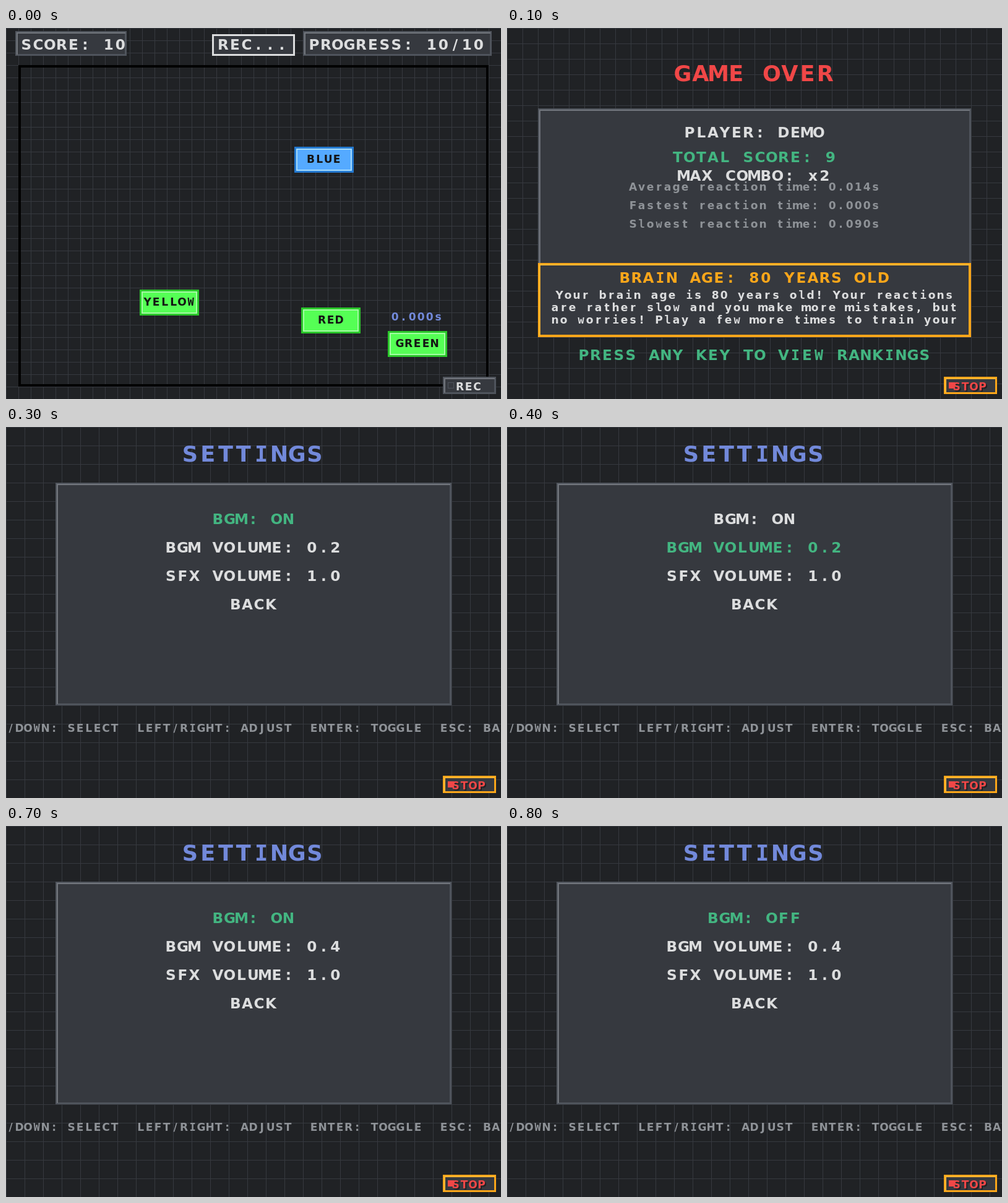
Recreate the animation shown at these times as an HTML page with a canvas. Size 800 px wide and 600 px high, loop 0.9 s.

```html
<!DOCTYPE html>
<html lang="en">
<head>
<meta charset="utf-8">
<title>Reaction game</title>
<style>
  html, body { margin: 0; width: 100%; height: 100%; overflow: hidden; background: #202225; }
  canvas { display: block; }
</style>
</head>
<body>
<canvas id="stage" width="800" height="600"></canvas>
<script>
const ctx = document.getElementById('stage').getContext('2d');

const BACK = '#202225', PANEL = '#36393f', EDGE = '#4f545c', SHINE = '#72767d';
const WHITE = '#dcddde', MUTED = '#8e9297', BLUE = '#7289da', GREEN = '#43b581';
const RED = '#f04747', ORANGE = '#faa61a', GOLD = '#ffb732';
const SMALL = 14, MEDIUM = 19, LARGE = 28.8;   // width of one character cell
const STEP = 100, STEPS = 9;

function rect(x, y, w, h, color) {
  ctx.fillStyle = color;
  ctx.fillRect(x, y, w, h);
}

function frame(x, y, w, h, line, color) {
  ctx.strokeStyle = color;
  ctx.lineWidth = line;
  ctx.strokeRect(x + line / 2, y + line / 2, w - line, h - line);
}

function grid(size) {
  rect(0, 0, 800, 600, BACK);
  for (let x = 0; x < 800; x += size) rect(x, 0, 1, 600, PANEL);
  for (let y = 0; y < 600; y += size) rect(0, y, 800, 1, PANEL);
}

function panel(x, y, w, h, edge = EDGE, shine = SHINE, line = 3) {
  rect(x, y, w, h, PANEL);
  frame(x, y, w, h, line, edge);
  rect(x + 2, y + 2, w - 4, 2, shine);
  rect(x + 2, y + 2, 2, h - 4, shine);
}

// Fixed-pitch text; the narrowest and widest letters use the monospaced cut.
function text(string, x, middle, cell, color) {
  const size = cell * 1.22;
  ctx.fillStyle = color;
  ctx.textAlign = 'center';
  [...string].forEach((char, i) => {
    const family = /[IWilw]/.test(char) ? 'DejaVu Sans Mono' : 'DejaVu Sans';
    ctx.font = `bold ${size}px "${family}", monospace`;
    ctx.fillText(char, x + cell * (i + 0.47), Math.round(middle + size * 0.36));
  });
}

function centered(string, middle, cell, color, x = 400) {
  text(string, x - string.length * cell / 2, middle, cell, color);
}

function stopButton() {
  panel(706, 564, 86, 28, ORANGE, GOLD);
  rect(714, 573, 10, 10, RED);
  text('STOP', 722, 582, SMALL, BACK);
  text('STOP', 720, 580, SMALL, RED);
}

function tile(label, x, y, fill, edge, inner) {
  rect(x, y, 96, 42, fill);
  frame(x, y, 96, 42, 3, edge);
  frame(x + 3, y + 3, 90, 36, 2, inner);
  centered(label, y + 20, SMALL, '#141414', x + 48);
}

function playScreen() {
  grid(20);
  frame(20, 60, 760, 520, 4, '#000');
  panel(15, 5, 180, 40);
  text('SCORE: 10', 24, 27, MEDIUM, WHITE);
  rect(333, 10, 134, 35, PANEL);
  frame(333, 10, 134, 35, 3, WHITE);
  text('REC...', 342, 27, MEDIUM, WHITE);
  panel(480, 5, 305, 40);
  text('PROGRESS: 10/10', 489, 27, MEDIUM, WHITE);

  const green = ['#55ff55', '#2bc72b', '#a5ffa5'];
  tile('BLUE', 466, 192, '#55aaff', '#2479cf', '#a5dcff');
  tile('YELLOW', 216, 423, ...green);
  tile('RED', 477, 452, ...green);
  tile('GREEN', 617, 490, ...green);
  text('0.000s', 622, 467, SMALL, BLUE);

  panel(706, 564, 86, 28);
  frame(714, 573, 10, 10, 1, EDGE);
  text('REC', 727, 580, SMALL, WHITE);
}

function gameOverScreen() {
  grid(25);
  centered('GAME OVER', 73, LARGE, RED);
  panel(50, 130, 700, 370);
  centered('PLAYER: DEMO', 169, MEDIUM, WHITE);
  centered('TOTAL SCORE: 9', 209, MEDIUM, GREEN);
  centered('MAX COMBO: x2', 239, MEDIUM, WHITE);
  centered('Average reaction time: 0.014s', 257, SMALL, MUTED);
  centered('Fastest reaction time: 0.000s', 287, SMALL, MUTED);
  centered('Slowest reaction time: 0.090s', 317, SMALL, MUTED);

  panel(50, 380, 700, 120, ORANGE, GOLD, 4);
  centered('BRAIN AGE: 80 YEARS OLD', 404, MEDIUM, ORANGE);
  centered('Your brain age is 80 years old! Your reactions', 432, SMALL, WHITE);
  centered('are rather slow and you make more mistakes, but', 452, SMALL, WHITE);
  centered('no worries! Play a few more times to train your', 472, SMALL, WHITE);
  centered('PRESS ANY KEY TO VIEW RANKINGS', 529, MEDIUM, GREEN);
  stopButton();
}

function rankingsScreen() {
  grid(30);
  centered('RANKINGS', 43, LARGE, WHITE, 399);
  panel(30, 80, 740, 380);
  rect(50, 100, 700, 30, BLUE);
  frame(50, 100, 700, 30, 2, RED);
  const entry = '1. DEMO - SCORE: 9';
  centered(entry, 117, MEDIUM, BACK, 402);
  centered(entry, 115, MEDIUM, RED);
  centered('ESC: QUIT | ANY KEY: RESTART | S: SETTINGS', 487, SMALL, MUTED);
  stopButton();
}

function settingsScreen(selected, volume, music) {
  grid(30);
  centered('SETTINGS', 43, LARGE, BLUE, 399);
  panel(80, 90, 640, 360);
  ['BGM: ' + music, 'BGM VOLUME: ' + volume, 'SFX VOLUME: 1.0', 'BACK'].forEach((row, i) =>
    centered(row, 149 + 46 * i, MEDIUM, i === selected ? GREEN : WHITE));
  centered('UP/DOWN: SELECT  LEFT/RIGHT: ADJUST  ENTER: TOGGLE  ESC: BACK', 487, SMALL, MUTED);
  stopButton();
}

function draw(step) {
  if (step === 0) playScreen();
  else if (step === 1) gameOverScreen();
  else if (step === 2) rankingsScreen();
  else {
    const selected = step >= 4 && step <= 6 ? 1 : 0;
    const volume = Math.min(Math.max(step - 2, 2), 4) / 10;
    settingsScreen(selected, volume, step === 8 ? 'OFF' : 'ON');
  }
}

function tick() {
  draw(Math.floor(performance.now() / STEP) % STEPS);
  requestAnimationFrame(tick);
}
tick();
</script>
</body>
</html>
```
